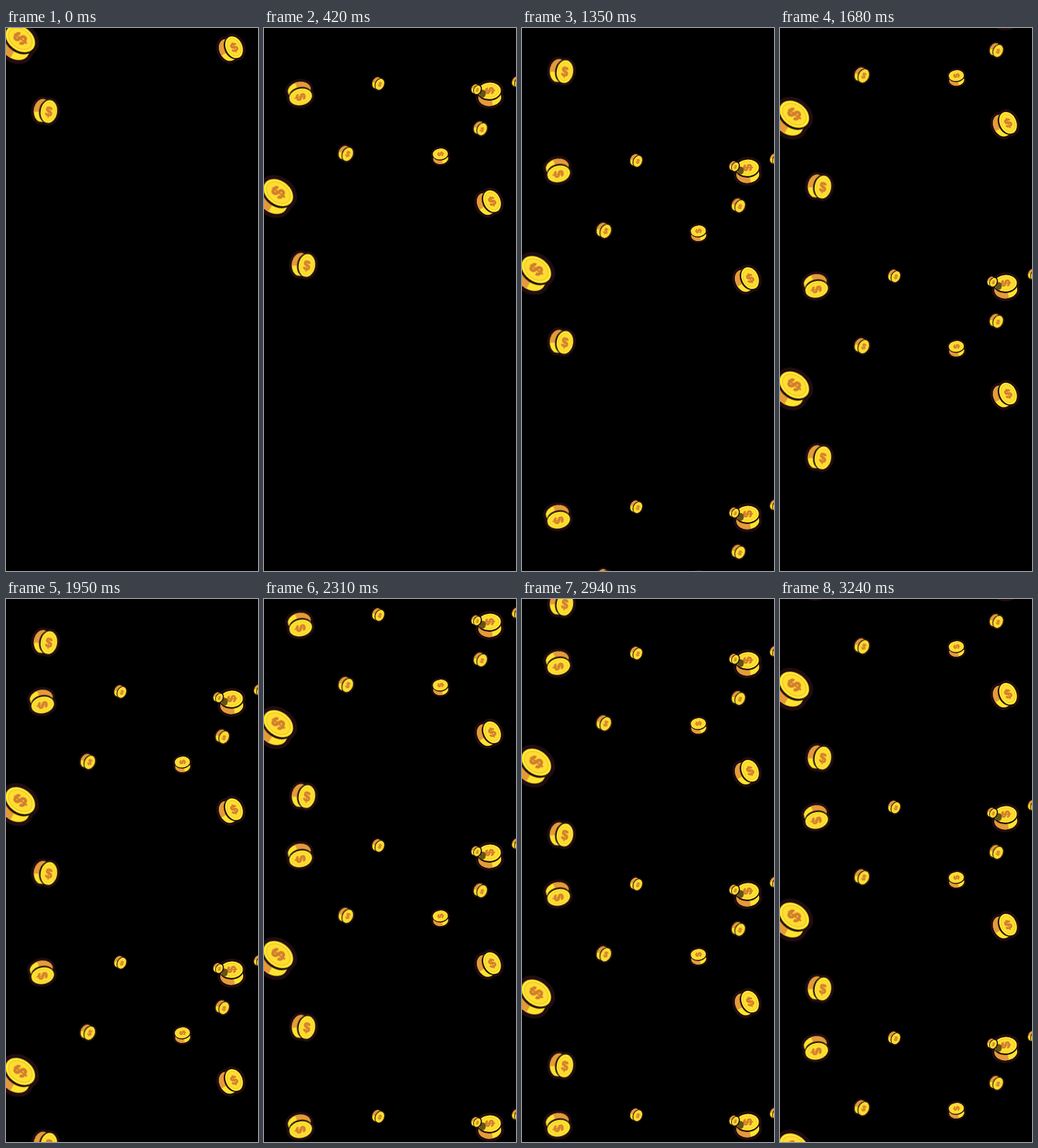
These frames come from a looping animation (354x762 px, 3.27 s). An HTML page:

```html
<!DOCTYPE html>
<html lang="en">
<head>
<meta charset="utf-8">
<title>Falling coins</title>
<style>
  html, body { margin: 0; width: 100%; height: 100%; overflow: hidden; background: #000; }
  svg { display: block; width: 354px; height: 762px; }
  text { font: bold 18px "Liberation Sans", Arial, sans-serif; text-anchor: middle; }
</style>
</head>
<body>
<svg viewBox="0 0 354 762">
  <defs>
    <ellipse id="disc" rx="11.8" ry="16.3"/>
    <clipPath id="backClip"><use href="#disc" x="-4.9"/></clipPath>
    <!-- A pair of coins of radius 20, the front coin towards +x -->
    <g id="coin">
      <g fill="#210d11" stroke="#210d11" stroke-width="8">
        <use href="#disc" x="-4.9"/>
        <use href="#disc" x="4.9"/>
      </g>
      <g clip-path="url(#backClip)">
        <path d="M-20-20H20V20H-20Z" fill="#ffe32e"/>
        <path d="M-20-20H20V-1L-20 4Z" fill="#e59a3a"/>
        <ellipse cx="3" rx="12.2" ry="17" fill="#241008"/>
      </g>
      <use href="#disc" x="4.9" fill="#ffec32"/>
      <ellipse cx="4.9" rx="9.3" ry="13.2" fill="#ffde30" stroke="#f2c02e" stroke-width=".9"/>
      <text x="5" y="6.4" fill="#d27d30" stroke="#d27d30" stroke-width=".8">$</text>
    </g>
    <g id="wave"></g>
  </defs>
  <g id="rain"></g>
</svg>
<script>
  const NS = "http://www.w3.org/2000/svg";
  const STEP = 54, TICK = 90, TICKS = 36, LOOP = 3270, WAVES = 6;
  const wave = document.getElementById("wave");
  const rain = document.getElementById("rain");

  function add(parent, tag, attrs) {
    const el = document.createElementNS(NS, tag);
    for (const key in attrs) el.setAttribute(key, attrs[key]);
    parent.append(el);
  }

  // Places coin pairs at the points; size and turn are rules of the index.
  function scatter(points, size, turn) {
    points.forEach(([x, y], i) => add(wave, "use", {
      href: "#coin",
      transform: `translate(${x} ${y}) rotate(${turn(i)}) scale(${size(i) / 20})`
    }));
  }

  // one large pair, four medium ones fanning round, six shrinking small ones
  scatter([[16, 20.5]], () => 28, () => -53);
  scatter([[317, -123], [316, 29], [55.5, 116.5], [50.5, -124]], () => 19.6, i => {
    const v = i - 1.5;
    return -8 + 30 * v + 12 * v ** 3;
  });
  add(wave, "ellipse", { cx: 307, cy: -124, rx: 4.6, ry: 5.6, fill: "#4a3b12", opacity: .85 });
  scatter([[248, -36], [115, -40], [304, -75], [160.5, -138], [356, -140], [298, -130]],
    i => 13 - 1.05 * i,
    i => i ? 25 : -95);

  // The gaps between waves shrink until they stay even.
  for (let i = 0, y = 0; i < WAVES; i++) {
    add(rain, "use", { href: "#wave", y });
    y -= 6 * STEP + Math.max(0, 162 - 106 * i);
  }

  const end = `translateY(${STEP * TICKS}px)`;
  rain.animate([
    { transform: "translateY(0px)", easing: `steps(${TICKS}, end)` },
    { transform: end, offset: TICK * TICKS / LOOP },
    { transform: end }
  ], { duration: LOOP, iterations: Infinity, delay: -1 });
</script>
</body>
</html>
```
